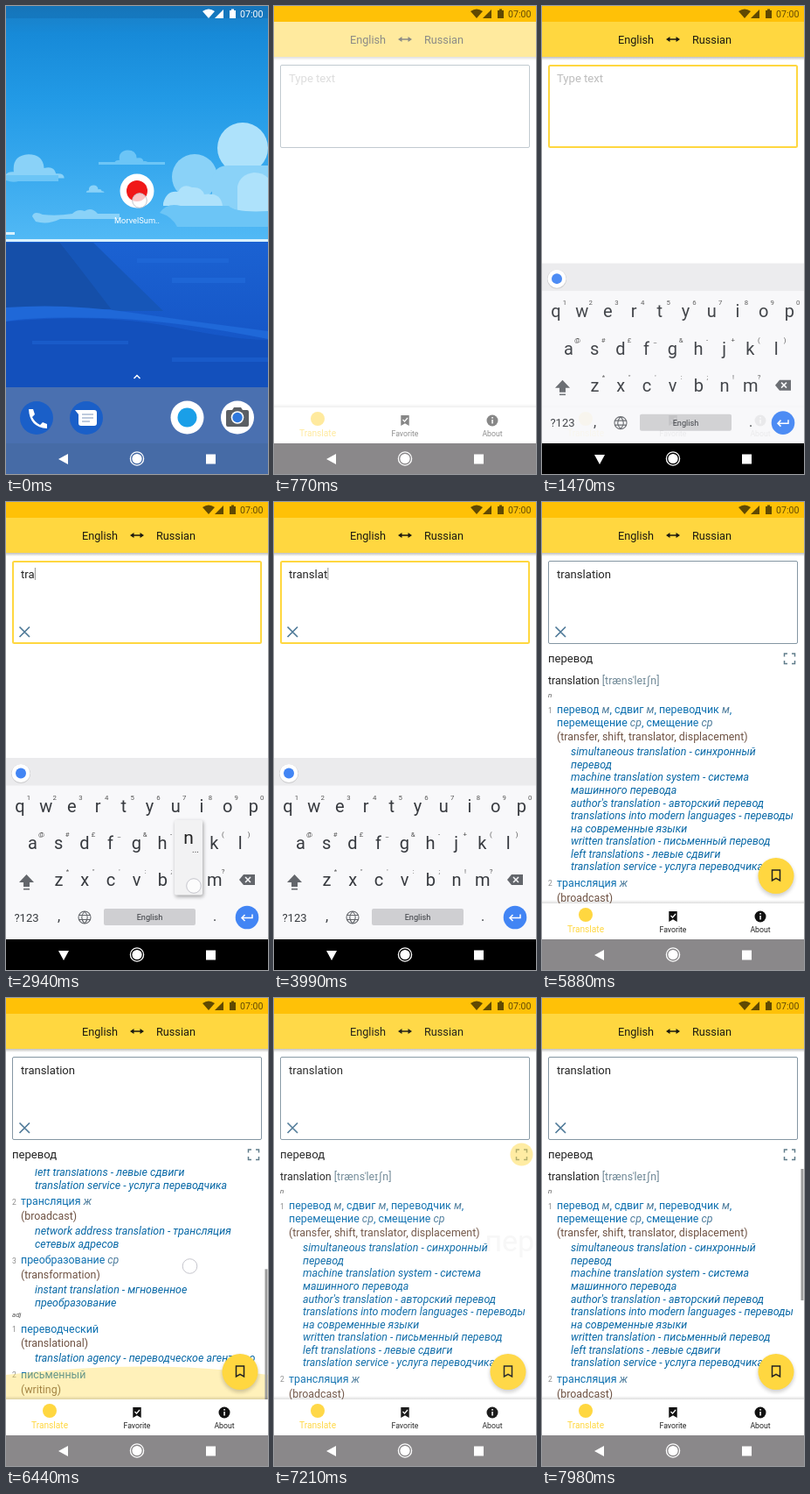
Recreate the animation shown at these times as an HTML page. Size 300 px wide and 534 px high, loop 8000 ms.

```html
<!DOCTYPE html>
<html lang="en">
<head>
<meta charset="utf-8">
<title>Translator demo</title>
<style>
html, body { margin: 0; width: 100%; height: 100%; overflow: hidden; background: #fff; }
svg { display: block; width: 300px; height: 534px; font-family: Roboto, sans-serif; }
.mid { text-anchor: middle; }
.i { font-style: italic; }
</style>
</head>
<body>
<svg id="stage" viewBox="0 0 300 534" xmlns="http://www.w3.org/2000/svg"></svg>
<script>
const LOOP = 8000, STEP = 70;
const YELLOW = '#ffd740', AMBER = '#ffc107', STEEL = '#8496a3';

const text = (x, y, size, fill, str, extra = '') =>
  `<text x="${x}" y="${y}" font-size="${size}" fill="${fill}" ${extra}>${str}</text>`;
const rect = (x, y, w, h, fill, extra = '') =>
  `<rect x="${x}" y="${y}" width="${w}" height="${h}" fill="${fill}" ${extra}/>`;
const circle = (x, y, r, fill, extra = '') =>
  `<circle cx="${x}" cy="${y}" r="${r}" fill="${fill}" ${extra}/>`;
const path = (d, fill, extra = '') => `<path d="${d}" fill="${fill}" ${extra}/>`;
const line = (d, stroke, width, extra = '') =>
  path(d, 'none', `stroke="${stroke}" stroke-width="${width}" ${extra}`);
const MID = 'class="mid"';

const statusBar = (fill, opacity) => `<g opacity="${opacity}" fill="${fill}">
  ${path('M225 6Q232 1 239 6L232 14Z', fill)}${path('M249 4V14H239Z', fill)}
  ${path('M256 5H258V3.500H261V5H263V14H256Z', fill)}
  ${text(268, 13, 10.6, fill, '07:00')}</g>`;

const navButtons = id => `<g id="${id}">${path('M60 517L71 511V523Z', '#fff')}</g>
  ${circle(150, 516.500, 5.600, '#fff')}
  ${circle(150, 516.500, 7.600, 'none', 'stroke="#fff" stroke-width="1.300"')}
  ${rect(229, 511.500, 11, 11, '#fff')}`;

// Launcher
const PALE = '#aee2fb', SOFT = '#8ad2f8', HAZE = '#6cc5f6';
const cloud = (x, y, s, fill) => path(
  'M-32 12Q-31 4-22 5Q-24-13-6-14Q10-14 11 1Q22-2 24 7Q33 6 33 12Z',
  fill, `transform="translate(${x} ${y}) scale(${s})"`);

const home = `
  ${rect(0, 0, 300, 268, 'url(#sky)')}
  ${circle(271, 162, 29, PALE)}${circle(216, 195, 26, SOFT)}
  ${path('M236 238V196Q240 181 256 182H300V238Z', SOFT)}
  ${path('M265 236V206Q268 192 284 190Q294 190 300 196V236Z', PALE)}
  ${path('M180 225Q184 210 197 212Q202 202 213 207Q224 206 227 215Q246 212 248 228H180Z', PALE)}
  ${path('M176 236Q184 224 200 228H255Q262 236 300 234V252H196Q190 240 176 236Z', HAZE)}
  ${cloud(32, 184, 1.050, SOFT)}${path('M0 193H60V200H14Q8 202 0 199Z', HAZE)}
  ${cloud(143, 173, .600, HAZE)}${rect(106, 178, 76, 3, HAZE)}
  ${cloud(102, 209, .320, SOFT)}
  ${path('M30 240Q32 233 42 238Q58 240 76 237Q82 231 90 234Q98 229 105 237H130V243H62Q48 250 34 246Z', SOFT)}
  ${rect(0, 266, 300, 3, '#d9f1fd')}${rect(0, 258, 10, 3, '#d9f1fd')}
  ${rect(0, 269, 300, 265, 'url(#sea)')}
  ${path('M0 270H62L122 346H0Z', '#154fa9')}${path('M62 270H100L180 348H122Z', '#1656b8')}
  ${path('M0 344Q70 339 145 350T300 371V380Q190 358 110 356T0 360Z', '#1f68d8')}
  ${path('M0 360Q110 350 190 366T300 381V435H0Z', '#1350bc')}
  ${rect(150, 288, 105, 5, '#1e66d6')}${rect(190, 310, 84, 6, '#1e66d6')}
  ${rect(30, 382, 110, 4, '#195bc9')}${rect(190, 401, 110, 5, '#195bc9')}
  ${rect(0, 435, 300, 99, '#4a70b0')}${rect(0, 499, 300, 35, '#466ba6')}
  ${rect(0, 0, 300, 14, '#0a5a96', 'opacity=".250"')}
  ${statusBar('#fff', 1)}
  ${circle(150, 211, 19.500, '#fff')}${circle(150, 211, 12, '#f01818')}
  ${text(150, 248, 9.300, '#fff', 'MorvelSum..', MID)}
  ${line('M146.500 425L150 421.500L153.500 425', '#fff', 1.500)}
  ${circle(35, 470, 19, '#1a5fc8')}
  ${path('M26 460H31L33 466L30 469Q33 475 39 478L42 475L47 477V482Q27 481 26 460Z', '#fff')}
  ${circle(92, 470, 19, '#1a5fc8')}
  ${path('M79 461H101Q104 461 104 464V476Q104 479 101 479H86Q83 479 83 476V466Z', '#fff')}
  ${line('M87 466H100M87 470H100M87 474H96', '#a9b9d2', 1.500)}
  ${circle(207.500, 469.500, 19, '#fff')}${circle(207.500, 469.500, 11, '#1a9fe8')}
  ${circle(265, 469.500, 19, '#fff')}
  ${path('M254 461H259L261 458H269L271 461H276Q278 461 278 463V478Q278 480 276 480H254Q252 480 252 478V463Q252 461 254 461Z', '#5b5f64')}
  ${circle(265, 469.500, 7.300, '#fff')}${circle(265, 469.500, 5.700, '#2f78dd')}
  ${navButtons('homeBack')}`;

// Dictionary: kind, centre line, text, optional number
const BLUE = '#0d70b0';
const KINDS = {
  word: { x: 17, size: 12.4, fill: BLUE },
  gloss: { x: 17, size: 12.4, fill: '#6f5344' },
  example: { x: 33, size: 12.4, fill: '#0868a6', italic: true },
  part: { x: 7, size: 8, fill: '#555', italic: true }
};
const ENTRIES = [
  ['part', 219, 'n'],
  ['word', 237, 'перевод _м_, сдвиг _м_, переводчик _м_,', 1],
  ['word', 251.5, 'перемещение _ср_, смещение _ср_'],
  ['gloss', 268, '(transfer, shift, translator, displacement)'],
  ['example', 285, 'simultaneous translation - синхронный'],
  ['example', 299.5, 'перевод'],
  ['example', 314, 'machine translation system - система'],
  ['example', 328.5, 'машинного перевода'],
  ['example', 343.5, "author's translation - авторский перевод"],
  ['example', 358, 'translations into modern languages - переводы'],
  ['example', 372.5, 'на современные языки'],
  ['example', 387, 'written translation - письменный перевод'],
  ['example', 401.5, 'left translations - левые сдвиги'],
  ['example', 416, 'translation service - услуга переводчика'],
  ['word', 434.5, 'трансляция _ж_', 2],
  ['gloss', 451.5, '(broadcast)'],
  ['example', 468.5, 'network address translation - трансляция'],
  ['example', 483, 'сетевых адресов'],
  ['word', 501.5, 'преобразование _ср_', 3],
  ['gloss', 518, '(transformation)'],
  ['example', 535.5, 'instant translation - мгновенное'],
  ['example', 550, 'преобразование'],
  ['part', 562.5, 'adj'],
  ['word', 580, 'переводческий', 1],
  ['gloss', 596.5, '(translational)'],
  ['example', 613.5, 'translation agency - переводческое агентство'],
  ['word', 632, 'письменный', 2],
  ['gloss', 649.5, '(writing)']
];
const entry = ([kind, y, str, num]) => {
  const k = KINDS[kind];
  const rich = str.replace(/_(.+?)_/g, '<tspan class="i" fill="#4d7c9c">$1</tspan>');
  return (num ? text(7, y + 3.500, 8.500, '#8a8a8a', num) : '') +
    text(k.x, y + 4, k.size, k.fill, rich, k.italic ? 'class="i"' : '');
};

const bookmark = (x, y, w, h) => `M${x - w} ${y - h}H${x + w}V${y + h}L${x} ${y + h - w * .600}L${x - w} ${y + h}Z`;

const app = `
  ${rect(0, 0, 300, 534, '#fff')}
  <g id="content">
    ${rect(0, 58, 300, 4, 'url(#shade)')}${rect(0, 18, 300, 40, YELLOW)}
    ${text(87, 43, 12.7, '#1c1a10', 'English')}${text(172, 43, 12.7, '#1c1a10', 'Russian')}
    ${line('M144 38H156', '#1c1a10', 1.500)}
    ${path('M142 38L146.500 35V41ZM158 38L153.500 35V41Z', '#1c1a10')}
    <rect id="field" rx="1.500" fill="#fff"/>
    ${text(17, 86.500, 13.1, '#bdbdbd', 'Type text', 'id="hint"')}
    ${text(17, 86.500, 13.1, '#222', '', 'id="typed"')}
    ${rect(0, 75, .800, 14, '#777', 'id="caret"')}
    ${line('M15.500 142.500L27 154M27 142.500L15.500 154', '#4f7a98', 1.700, 'id="clear"')}
    <g id="spinner">${line('', AMBER, 1.600, 'id="arc"')}</g>
    <g id="result">
      ${text(7, 183, 13.1, '#222', 'перевод')}
      ${line('M277.500 176.500V173H281M286 173H289.500V176.500M289.500 181V184.500H286M281 184.500H277.500V181', '#607d8b', 1.500)}
      ${circle(283.500, 178.500, 13, YELLOW, 'id="ripple"')}
      <g clip-path="url(#listClip)">
        <g id="list">
          ${text(7, 208, 12.4, '#222', 'translation <tspan fill="#6f8896">[trænsˈleɪʃn]</tspan>')}
          ${ENTRIES.map(entry).join('')}
        </g>
        ${path('M0 458V430Q165 411 300 430V458Z', YELLOW, 'id="glow"')}
      </g>
      ${rect(296.500, 195, 3, 150, '#9c9c9c', 'id="scrollbar"')}
      <g id="fab">${circle(268, 429, 21, '#000', 'opacity=".180" filter="url(#blur)"')}
        ${circle(268, 426.500, 20.500, YELLOW)}
        ${line(bookmark(268, 426, 4.500, 6), '#222', 1.500)}</g>
    </g>
    ${rect(0, 454, 300, 4, 'url(#shadeUp)')}${rect(0, 458, 300, 41, '#fff')}
    ${circle(50, 471, 8, YELLOW)}${text(50, 491, 10.2, YELLOW, 'Translate', MID)}
    ${path(bookmark(150, 473, 4.700, 6), '#111')}
    ${line('M147.500 472L149.500 474L153 470', '#fff', 1.200)}
    ${text(150, 491, 8.700, '#222', 'Favorite', MID)}
    ${circle(250, 473, 6.500, '#111')}${rect(249.300, 472, 1.500, 4.500, '#fff')}${rect(249.300, 469, 1.500, 1.600, '#fff')}
    ${text(250, 491, 8.700, '#222', 'About', MID)}
  </g>
  <g id="fullscreen">${rect(0, 18, 300, 481, '#fff')}
    ${text(150, 289, 34, '#555', 'перевод', 'class="mid" id="bigWord"')}</g>
  ${rect(0, 0, 300, 18, AMBER)}${statusBar('#000', .620)}`;

// Keyboard
const ROWS = [
  { keys: 'qwertyuiop', hints: '1234567890', x: 16, y: 347 },
  { keys: 'asdfghjkl', hints: '@#£_&-+()', x: 30.5, y: 389.5 },
  { keys: 'zxcvbnm', hints: '*"\':;!?', x: 60.5, y: 431.5 }
];
const PITCH = 29.7, KEY = '#373a3f';
const keyAt = ch => {
  const row = ROWS.find(r => r.keys.includes(ch));
  return { x: row.x + row.keys.indexOf(ch) * PITCH, y: row.y };
};
const escape = ch => ch.replace('&', '&amp;');
const letters = ROWS.map(r => [...r.keys].map((ch, i) => {
  const x = r.x + i * PITCH;
  return text(x, r.y + 6.500, 20, KEY, ch, MID) +
    text(x + 10, r.y - 7.500, 7.800, '#555', escape(r.hints[i]), MID);
}).join('')).join('');

const keyboard = `
  ${rect(0, 292, 300, 207, '#f8f8fa')}${rect(0, 292, 300, 31.500, '#ebebed')}
  ${circle(17, 310, 11, '#000', 'opacity=".120"')}${circle(17, 309.500, 10.500, '#fff')}${circle(17, 309.500, 6, '#4285f4')}
  ${letters}
  ${path('M23.500 425L32 434H27V439H20V434H15Z', '#63666b')}${rect(20, 441, 7, 1.500, '#63666b')}
  ${path('M272 425H285V437H272L267 431Z', '#63666b')}${line('M274 428L280 434M280 428L274 434', '#f8f8fa', 1.500)}
  ${text(23.500, 478.500, 13, KEY, '?123', MID)}${text(60.500, 478, 16, KEY, ',', MID)}
  ${line('M83 474A7 7 0 1 1 97 474A7 7 0 1 1 83 474M83.500 471.500H96.500M83.500 476.500H96.500M90 467Q83.500 474 90 481Q96.500 474 90 467', '#63666b', 1.100)}
  ${rect(112, 464, 105, 19, '#cfcfd2', 'rx="2"')}${text(164.500, 477, 9.200, KEY, 'English', MID)}
  ${text(239, 478, 16, KEY, '.', MID)}
  ${circle(276, 474, 13.300, '#4285f4')}
  ${line('M282 470.500V474.500H270M273.500 471L270 474.500L273.500 478', '#fff', 1.500)}`;

const gradient = (id, ...stops) => `<linearGradient id="${id}" x2="0" y2="1">${stops.map(([at, color, alpha = 1]) =>
  `<stop offset="${at}" stop-color="${color}" stop-opacity="${alpha}"/>`).join('')}</linearGradient>`;

document.getElementById('stage').innerHTML = `<defs>
  ${gradient('sky', [0, '#1a7ec4'], [.12, '#178ad8'], [.4, '#229ae6'], [.7, '#38a9ee'], [1, '#52b9f5'])}
  ${gradient('sea', [0, '#1b62d2'], [.4, '#1657c8'], [1, '#0f47a8'])}
  ${gradient('shade', [0, '#000', .25], [1, '#000', 0])}
  ${gradient('shadeUp', [0, '#000', 0], [1, '#000', .13])}
  <filter id="blur" x="-50%" y="-50%" width="200%" height="200%"><feGaussianBlur stdDeviation="2"/></filter>
  <clipPath id="listClip"><rect x="0" y="195" width="300" height="263"/></clipPath>
  <clipPath id="revealClip"><rect id="reveal"/></clipPath></defs>
  ${home}
  <g id="app" clip-path="url(#revealClip)">${app}
    <g id="keyboard">${keyboard}</g>
    ${rect(0, 499, 300, 35, '#8a888a')}${rect(0, 499, 300, 35, '#000', 'id="navDark"')}
    ${navButtons('back')}
  </g>
  <g id="popup">${rect(-15, -67, 32, 86, '#000', 'rx="2" opacity=".350" filter="url(#blur)"')}
    ${rect(-16, -69, 32, 86, '#f2f2f3', 'rx="2"')}
    ${text(0, -42, 21, '#222', '', 'class="mid" id="popupKey"')}${text(8, -32, 10, '#444', '...', MID)}</g>
  ${circle(0, 0, 8.300, '#fff', 'id="touch" fill-opacity=".750" stroke="#c6c6cd" stroke-width="1"')}`;

const el = {};
document.querySelectorAll('[id]').forEach(node => { el[node.id] = node; });
const set = (id, attrs) => {
  for (const name in attrs) el[id].setAttribute(name, attrs[name]);
};
const show = (id, on) => set(id, { display: on ? 'inline' : 'none' });

const ramp = (t, a, b) => Math.min(1, Math.max(0, (t - a) / (b - a)));
const easeOut = u => 1 - (1 - u) ** 2;
const easeInOut = u => u * u * (3 - 2 * u);
const mix = (a, b, u) => a + (b - a) * u;

const WORD = 'translation';
const DOWN = [1960, 2380, 2590, 2870, 3220, 3430, 3640, 3850, 4060, 4270, 4480];
const UP = [2170, 2520, 2730, 3080, 3360, 3570, 3780, 3990, 4200, 4410, 4620];
const TOUCHES = [
  [0, 140, 153, 222],
  [1050, 1260, 150, 112],
  [5460, 5600, 66, 517],
  [6160, 6510, 208, 440, 210.5, 306],
  [6580, 6860, 210, 230, 210, 400],
  [7000, 7140, 284, 179],
  [7630, 7770, 66, 517],
  ...[...WORD].map((ch, i) => [DOWN[i], UP[i], keyAt(ch).x + 6, keyAt(ch).y + 6.5])
];

function drawTouch(t) {
  const hit = TOUCHES.find(([a, b]) => t >= a && t < b);
  show('touch', hit);
  if (!hit) return;
  const [a, b, x, y, x2 = x, y2 = y] = hit;
  const u = easeOut(ramp(t, a, b - STEP));
  set('touch', { cx: mix(x, x2, u), cy: mix(y, y2, u) });
}

function drawField(t) {
  const focused = t >= 1260 && t < 5600;
  const edge = focused ? 0 : .5;
  set('field', {
    x: 8 - edge, y: 68 - edge, width: 284 + 2 * edge, height: 93 + 2 * edge,
    stroke: focused ? YELLOW : STEEL, 'stroke-width': focused ? 2 : 1
  });
}

function drawTyping(t) {
  const typed = WORD.slice(0, UP.filter(up => t >= up).length);
  el.typed.textContent = typed;
  show('hint', !typed);
  show('clear', typed);
  show('caret', t >= 1820 && t < 4830);
  set('caret', { x: 17.3 + (typed ? el.typed.getComputedTextLength() : 0) });
  const pressed = DOWN.findIndex((down, i) => t >= down && t < UP[i]);
  show('popup', pressed >= 0);
  if (pressed >= 0) {
    const { x, y } = keyAt(WORD[pressed]);
    el.popupKey.textContent = WORD[pressed];
    set('popup', { transform: `translate(${x} ${y})` });
  }
}

function drawSpinner(t) {
  show('spinner', t >= 4970 && t < 5250);
  const point = deg => {
    const a = deg * Math.PI / 180;
    return `${150 + 13.5 * Math.cos(a)} ${238 + 13.5 * Math.sin(a)}`;
  };
  const start = 45 + (t - 5110) * .35;
  const sweep = 205 + (t - 5110) * .5;
  set('arc', { d: `M${point(start)}A13.5 13.5 0 ${sweep > 180 ? 1 : 0} 1 ${point(start + sweep)}` });
}

function drawResult(t) {
  show('result', t >= 5250);
  const scroll = 202.4 * (easeOut(ramp(t, 6160, 6440)) - easeInOut(ramp(t, 6580, 6860)));
  set('list', { transform: `translate(0 ${-scroll})` });
  set('scrollbar', { y: 195 + scroll * .565 });
  show('scrollbar', (t >= 6160 && t < 7140) || t >= 7840);
  set('glow', { opacity: .36 * ramp(t, 6300, 6440) * (1 - ramp(t, 6440, 6650)) });
  set('ripple', { opacity: t >= 7000 ? .5 * (1 - ramp(t, 7210, 7420)) : 0, r: mix(5, 13, ramp(t, 7000, 7140)) });
  const fab = easeOut(ramp(t, 5250, 5530));
  set('fab', { transform: `translate(268 427) scale(${fab}) translate(-268 -427)` });
  const page = easeInOut(ramp(t, 7180, 7420)) * (1 - easeInOut(ramp(t, 7700, 7910)));
  set('fullscreen', { opacity: page });
  set('bigWord', { x: 150 + 165 * (1 - page) });
}

function draw(now) {
  const t = Math.floor(now % LOOP / STEP) * STEP;
  const open = easeOut(ramp(t, 0, 420));
  show('app', t >= 70);
  set('app', { opacity: ramp(t, 0, 210) });
  set('reveal', { x: mix(131, 0, open), y: mix(192, 0, open), width: mix(38, 300, open), height: mix(38, 534, open) });
  set('content', { opacity: ramp(t, 700, 840) });

  const kb = easeOut(ramp(t, 1260, 1540)) * (1 - ramp(t, 5530, 5810));
  set('keyboard', { opacity: kb, transform: `translate(0 ${(1 - kb) * 26})` });
  show('keyboard', kb > 0);
  set('navDark', { opacity: Math.min(1, kb * 1.2) });
  set('back', { transform: `rotate(${-90 * Math.min(1, kb * 1.1)} 66 517)` });

  drawField(t);
  drawTyping(t);
  drawSpinner(t);
  drawResult(t);
  drawTouch(t);
}

const begin = performance.now();
function tick() {
  draw(performance.now() - begin);
  requestAnimationFrame(tick);
}
tick();
</script>
</body>
</html>
```
